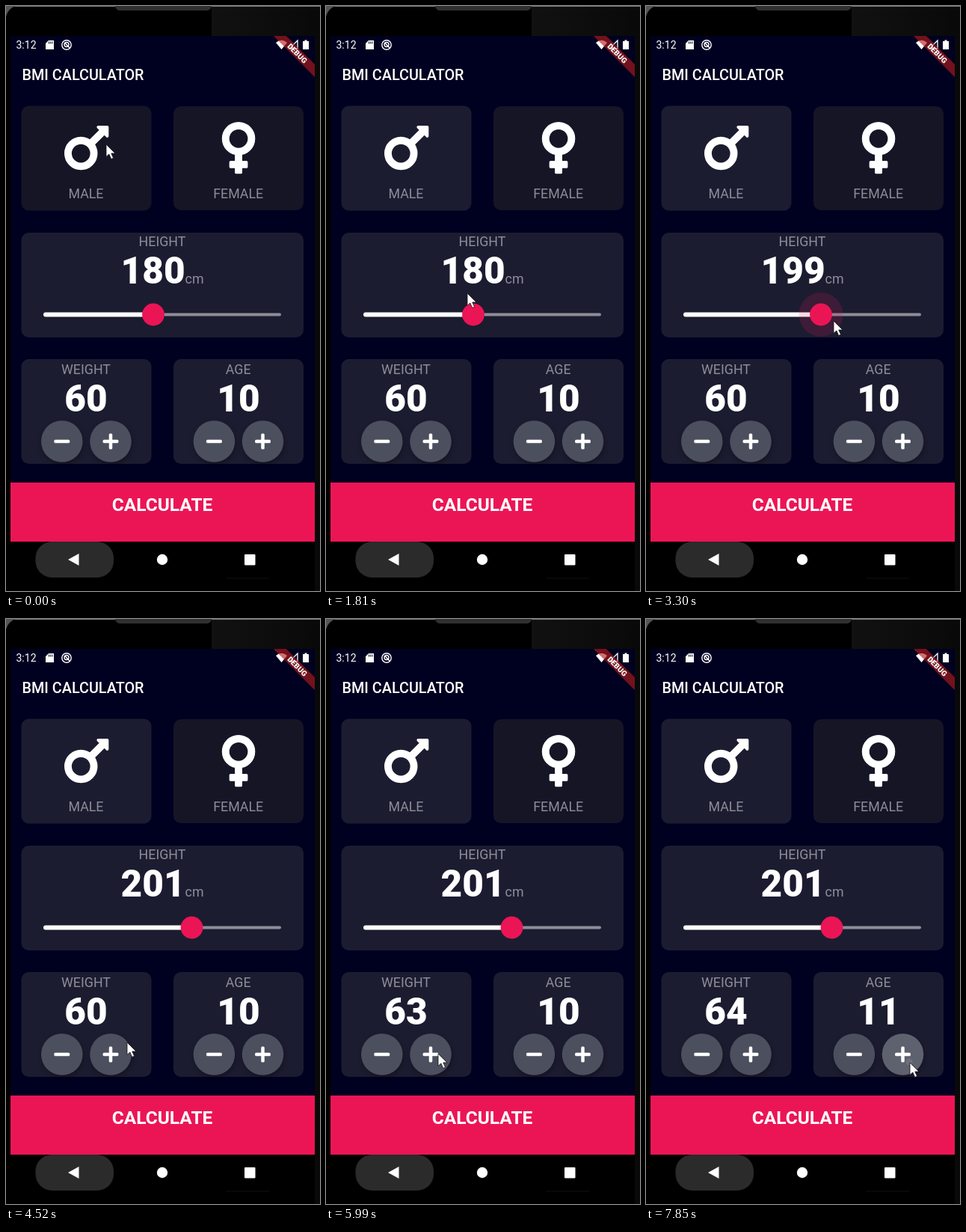
An HTML page for the animation above (7990 ms loop, 420 by 782 pixels).

```html
<!DOCTYPE html>
<html lang="en">
<head>
<meta charset="utf-8">
<title>BMI calculator</title>
<style>
html, body { margin: 0; width: 100%; height: 100%; overflow: hidden; background: #000; }
svg { display: block; width: 100%; height: 100%; font-family: Roboto, sans-serif; }
.label { font-size: 17.8px; fill: #8d8e98; text-anchor: middle; }
.number { font-size: 49.5px; font-weight: 900; fill: #fff; text-anchor: middle; }
.button { fill: #4c4f5e; filter: drop-shadow(1px 3px 3px #0005); }
.active { fill: #1c1c31; }
.idle { fill: #161526; }
</style>
</head>
<body>
<svg viewBox="0 0 420 782">
  <defs>
    <clipPath id="screen"><rect x="6" y="40" width="407" height="676"/></clipPath>
    <linearGradient id="bezel"><stop offset="0" stop-color="#111"/><stop offset="1" stop-color="#090909"/></linearGradient>
    <g id="minus">
      <circle class="button" r="27.8"/>
      <rect x="-10.4" y="-2.2" width="20.8" height="4.5" rx="1.5" fill="#fff"/>
    </g>
    <g id="plus">
      <use href="#minus"/>
      <rect x="-2.25" y="-10.4" width="4.5" height="20.8" rx="1.5" fill="#fff"/>
    </g>
  </defs>

  <!-- Phone body -->
  <rect width="420" height="782" fill="#000"/>
  <path d="M275 0H420V782H413V40H275Z" fill="url(#bezel)"/>
  <path d="M0 .5H420" stroke="#777"/>
  <path d="M0 0H13Q3 3 0 14Z" fill="#555"/>
  <path d="M146 0H275Q274 6 268 6H153Q147 6 146 0Z" fill="#303030"/>
  <path d="M294 765H352" stroke="#111"/>

  <!-- Screen -->
  <g clip-path="url(#screen)">
    <rect x="6" y="40" width="407" height="676" fill="#000020"/>
    <rect x="6" y="637" width="407" height="79" fill="#eb1555"/>
  </g>
  <g fill="#fff">
    <text x="13.5" y="57" font-size="14">3:12</text>
    <path d="M57 46H64V58H53V50Z"/>
    <path d="M57.5 47.5V50.5M59.7 47.5V50.5M61.9 47.5V50.5" stroke="#000020"/>
    <g fill="none" stroke="#fff" stroke-width="1.4">
      <circle cx="81" cy="52" r="6.2"/>
      <circle cx="81" cy="51.5" r="3"/>
      <path d="M79 49.5L85 56"/>
    </g>
    <path d="M361 49Q368.5 42.5 376 49L368.5 58Z"/>
    <path d="M379 57L390 46V57Z" fill="none" stroke="#fff" stroke-width="1.3"/>
    <path d="M397 47H399.5V45.5H402.5V47H405V58H397Z"/>
  </g>
  <g clip-path="url(#screen)">
    <g transform="translate(389.7 63.3) rotate(45)">
      <rect x="-45" y="-6" width="90" height="12" fill="#b71c1c" fill-opacity=".63"/>
      <text y="3.6" font-size="10.1" font-weight="900" fill="#fff" text-anchor="middle">DEBUG</text>
    </g>
  </g>
  <text x="21.5" y="98.5" font-size="19.8" font-weight="500" fill="#fff">BMI CALCULATOR</text>

  <!-- Cards -->
  <rect id="male" x="20.5" y="133.5" width="174" height="140" rx="10"/>
  <rect class="idle" x="224" y="134" width="174" height="139" rx="10"/>
  <rect class="active" x="20.5" y="303" width="377.5" height="140" rx="10"/>
  <rect class="active" x="20.5" y="472" width="174" height="140" rx="10"/>
  <rect class="active" x="224" y="472" width="174" height="140" rx="10"/>

  <g transform="translate(78 150.1) scale(.1545)" fill="#fff">
    <path d="M292 64H372Q384 64 384 76V155C384 165.7 371.1 171 363.6 163.5L284.5 84.4C277 76.9 282.3 64 292 64Z"/>
    <g fill="none" stroke="#fff" stroke-width="64">
      <circle cx="144" cy="304" r="112"/>
      <path d="M230 218L328 120"/>
    </g>
  </g>
  <g transform="translate(288.8 150.1) scale(.1545)" fill="#fff">
    <circle cx="144" cy="176" r="112" fill="none" stroke="#fff" stroke-width="64"/>
    <rect x="112" y="305" width="64" height="175" rx="12"/>
    <rect x="64" y="368" width="160" height="64" rx="12"/>
  </g>

  <text class="label" x="107" y="257">MALE</text>
  <text class="label" x="310.7" y="257">FEMALE</text>
  <text class="label" x="209" y="320.5">HEIGHT</text>
  <text class="label" x="107" y="492">WEIGHT</text>
  <text class="label" x="310.7" y="492">AGE</text>

  <text class="number" x="209" y="371"><tspan id="height"></tspan><tspan font-size="17.8" font-weight="400" fill="#8d8e98">cm</tspan></text>
  <text class="number" id="weight" x="107" y="542"></text>
  <text class="number" id="age" x="311" y="542"></text>

  <!-- Slider -->
  <g stroke-linecap="round">
    <path d="M60 412.5H366" stroke="#8d8e98" stroke-width="4"/>
    <path id="filled" stroke="#fff" stroke-width="6"/>
  </g>
  <g id="thumb">
    <circle id="halo" fill="#eb1555" fill-opacity=".16"/>
    <circle r="14.9" fill="#eb1555"/>
  </g>

  <use href="#minus" x="74.8" y="582"/>
  <use href="#plus" x="140" y="582"/>
  <use href="#minus" x="278.4" y="582"/>
  <use href="#plus" x="343.5" y="582"/>
  <g fill="#fff" fill-opacity=".1">
    <circle id="weightPress" cx="140" cy="582" r="27.8"/>
    <circle id="agePress" cx="343.5" cy="582" r="27.8"/>
    <circle id="ripple" cx="352" cy="592" r="4.5"/>
  </g>

  <text x="209" y="675" font-size="24.5" font-weight="700" fill="#fff" text-anchor="middle">CALCULATE</text>

  <!-- Navigation bar -->
  <rect x="39.5" y="716" width="104.5" height="48" rx="22" fill="#2b2b2b"/>
  <g fill="#fff">
    <path d="M83 740L97.5 732V748Z"/>
    <circle cx="209" cy="740" r="7.2"/>
    <rect x="319" y="733" width="14.5" height="14.5" rx="1"/>
  </g>

  <path id="cursor" d="M0 0V16.5L3.8 13L6.7 19.5L9.6 18.2L6.8 12H12Z" fill="#fff" stroke="#111" stroke-width=".8"/>
</svg>
<script>
const LOOP = 7990;
const $ = id => document.getElementById(id);

// Pointer moves: first step, last step, step count, destination x, y.
const moves = [
  [840, 1260, 3, 112, 260],
  [1420, 1810, 4, 189, 384],
  [1960, 2080, 2, 198, 412],
  [2780, 3300, 5, 251, 421],
  [4130, 4520, 4, 162, 566],
  [4660, 4940, 3, 150, 581],
  [6690, 6810, 2, 331, 577],
  [6960, 6960, 1, 369, 588],
  [7080, 7380, 3, 353, 593]
];

// Stepped values: [time, value].
const heights = [[0, 180], [2910, 185], [3040, 190], [3170, 195], [3300, 199], [3420, 201]];
const thumbs = [[0, 197], [2780, 199], [2910, 206], [3040, 215], [3170, 225], [3300, 234], [3420, 248.5]];
const halos = [[0, 0], [2650, 20], [2780, 29.5], [3990, 18], [4130, 0]];
const weights = [[0, 60], [5210, 61], [5470, 62], [5870, 63], [6570, 64]];
const ages = [[0, 10], [7690, 11]];

const valueAt = (keys, t) => keys.findLast(([start]) => start <= t)[1];

function pointerAt(t) {
  let x = 134, y = 185;
  for (const [start, end, count, toX, toY] of moves) {
    if (t < start) break;
    const interval = (end - start) / (count - 1) || 1;
    const progress = Math.min(1, (Math.floor((t - start) / interval + 1e-6) + 1) / count);
    x += (toX - x) * progress;
    y += (toY - y) * progress;
  }
  return [x, y];
}

const show = (id, visible) => $(id).setAttribute("visibility", visible ? "visible" : "hidden");

function render(t) {
  const thumb = valueAt(thumbs, t);
  $("male").setAttribute("class", t < 280 ? "idle" : "active");
  $("height").textContent = valueAt(heights, t);
  $("weight").textContent = valueAt(weights, t);
  $("age").textContent = valueAt(ages, t);
  $("filled").setAttribute("d", `M53 412.5H${thumb}`);
  $("thumb").setAttribute("transform", `translate(${thumb} 412.5)`);
  $("halo").setAttribute("r", valueAt(halos, t));
  show("weightPress", t >= 5870 && t < 5990);
  show("agePress", t >= 7690);
  show("ripple", t >= 7850);
  $("cursor").setAttribute("transform", `translate(${pointerAt(t)})`);
}

const origin = performance.now();
function tick() {
  render((performance.now() - origin) % LOOP);
  requestAnimationFrame(tick);
}
tick();
</script>
</body>
</html>
```
